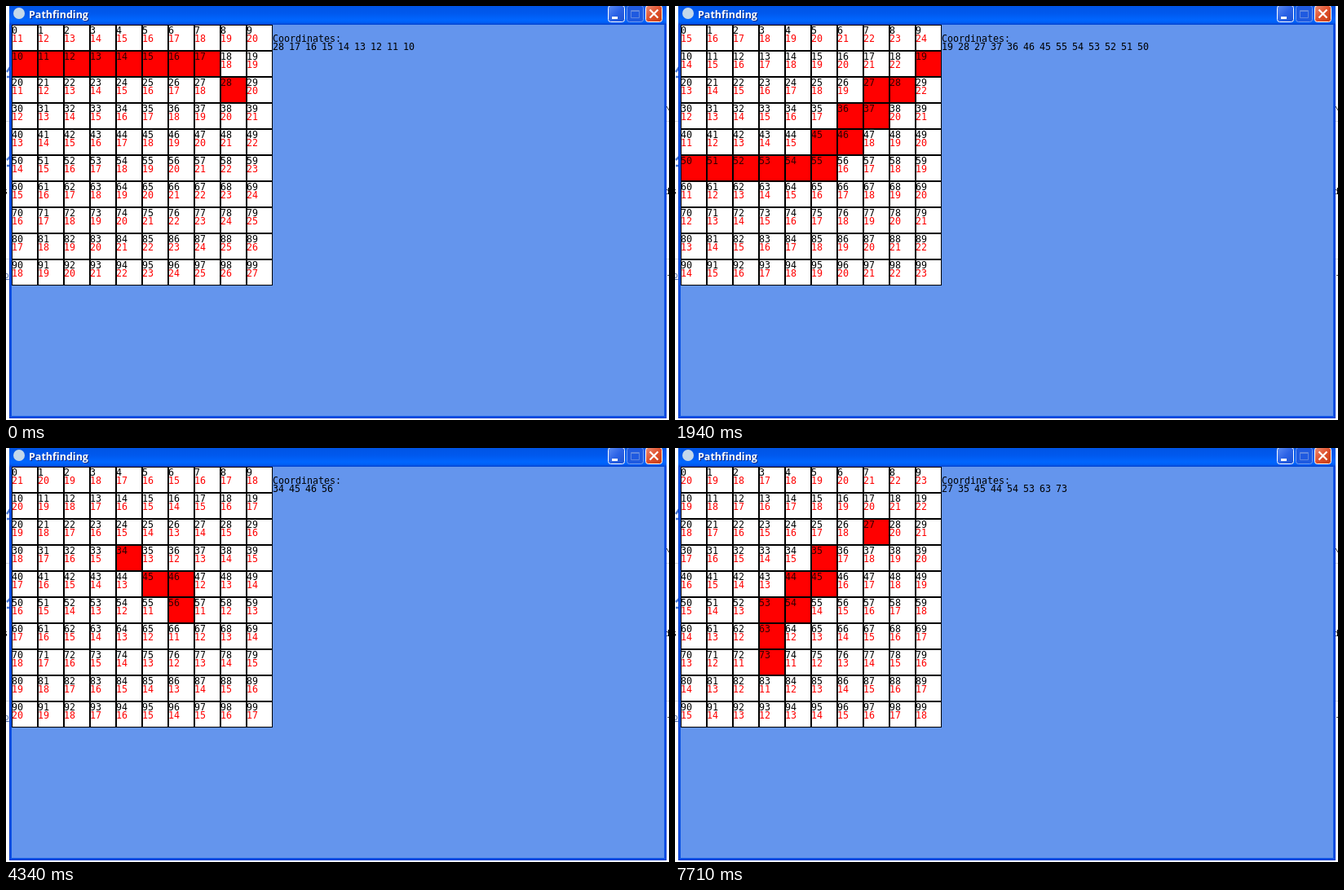
Animation of 813x508 px, one loop 8000 ms. Source, as an HTML page:

```html
<!DOCTYPE html>
<html lang="en">
<head>
<meta charset="utf-8">
<title>Pathfinding</title>
<style>
  html, body { margin: 0; width: 100%; height: 100%; overflow: hidden; background: #fff; }
  svg { display: block; }
  .mono { font: 11.63px "DejaVu Sans Mono", monospace; word-spacing: -1px; }
  .title { font: bold 12.5px "Open Sans", sans-serif; }
  .page { font: 11px "DejaVu Sans", sans-serif; }
</style>
</head>
<body>
<svg id="stage" width="813" height="508" viewBox="0 0 813 508">
  <defs>
    <linearGradient id="bar" x2="0" y2="1">
      <stop offset="0" stop-color="#0054e4"/>
      <stop offset=".4" stop-color="#0059ee"/>
      <stop offset=".75" stop-color="#0066ff"/>
      <stop offset=".88" stop-color="#005ff5"/>
      <stop offset="1" stop-color="#0040cc"/>
    </linearGradient>
    <linearGradient id="blue" x2="1" y2="1">
      <stop offset="0" stop-color="#5c8cf4"/>
      <stop offset=".5" stop-color="#2c63e6"/>
      <stop offset="1" stop-color="#1c50d0"/>
    </linearGradient>
    <linearGradient id="red" x2="1" y2="1">
      <stop offset="0" stop-color="#ee9078"/>
      <stop offset=".5" stop-color="#e0502c"/>
      <stop offset="1" stop-color="#c43c12"/>
    </linearGradient>
  </defs>

  <!-- page behind the window -->
  <rect width="813" height="508" fill="#fff"/>
  <path d="M0 141.5H813M0 310.5H813" stroke="#d4d8e0"/>
  <path d="M5 75L1 81M1 87H5M5 185L1 189M1 196H5" stroke="#4a78d0" stroke-width="2.5" fill="none"/>
  <g class="page">
    <text x="-4" y="231">s</text>
    <text x="-3" y="334" fill="#5570a8" text-decoration="underline">o</text>
    <text x="807" y="231">d</text>
    <path d="M810 123L813 128" stroke="#333"/>
    <rect x="811" y="330" width="2" height="1" fill="#555"/>
  </g>

  <!-- window -->
  <rect x="4" width="806" height="506" fill="#0037d0"/>
  <rect x="5" width="804" height="505" fill="#0a52e4"/>
  <rect x="4" width="806" height="23" fill="url(#bar)"/>
  <rect x="7" y="23" width="800" height="480" fill="#6495ed"/>
  <circle cx="16" cy="9" r="7" fill="#c4d8ea"/>
  <g class="title">
    <text x="29" y="16" fill="#0a2a88">Pathfinding</text>
    <text x="28" y="15" fill="#fff">Pathfinding</text>
  </g>
  <g stroke="#fff">
    <rect x="738.5" y="-.5" width="20" height="20" rx="3" fill="url(#blue)"/>
    <rect x="761.5" y="-.5" width="20" height="20" rx="3" fill="#1f5ae0" stroke="#6f9cf2"/>
    <rect x="784.5" y="-.5" width="20" height="20" rx="3" fill="url(#red)"/>
    <path d="M743 14.5H750" stroke-width="3"/>
    <path d="M766.5 5.5H776.5V14.5H766.5ZM766 6.5H777" stroke="#6088e0" fill="none"/>
    <path d="M789.5 4.5L799.5 14.5M799.5 4.5L789.5 14.5" stroke-width="2.2"/>
  </g>

  <g id="grid" class="mono"></g>
  <g class="mono">
    <text x="327" y="44">Coordinates:</text>
    <text id="list" x="327" y="54"></text>
  </g>
</svg>
<script>
const LOOP = 8000, SIZE = 10, CELL = 32, LEFT = 7, TOP = 23;

// [start time in ms, path from first cell to goal]
const STEPS = [
  [0, "28 17 16 15 14 13 12 11 10"],
  [580, "45 54 53 63 62 72 82"],
  [700, "54 63 62 72 71 81 91"],
  [1790, "32 41 40 50 60"],
  [1940, "19 28 27 37 36 46 45 55 54 53 52 51 50"],
  [3190, "47 56 55 65 75 74 84 94"],
  [3350, "27 35 45 44 54 53 63 73 83"],
  [4220, "60 51 52 42 43 33 34"],
  [4340, "34 45 46 56"],
  [5450, "37 48 58 68 78"],
  [5570, "57 68 78 88 98"],
  [6530, "70 62 52 53 43 44 34 24"],
  [6650, "18 27 37 36 46 45 55"],
  [7710, "27 35 45 44 54 53 63 73"]
];

const grid = document.getElementById("grid");
const list = document.getElementById("list");

function add(tag, attrs, text = "") {
  const el = document.createElementNS("http://www.w3.org/2000/svg", tag);
  for (const key in attrs) el.setAttribute(key, attrs[key]);
  el.textContent = text;
  return grid.appendChild(el);
}

const cells = Array.from({ length: SIZE * SIZE }, (_, i) => {
  const row = Math.floor(i / SIZE), col = i % SIZE;
  const x = LEFT + col * CELL, y = TOP + row * CELL;
  add("rect", { x, y, width: CELL, height: CELL });
  return {
    row, col,
    fill: add("rect", { x: x + 1, y: y + 1, width: CELL - 2, height: CELL - 2 }),
    index: add("text", { x, y: y + 11 }, i),
    cost: add("text", { x, y: y + 21, fill: "#f00" })
  };
});

function show(path) {
  const route = path.split(" ").map(Number);
  const goal = cells[route[route.length - 1]];
  cells.forEach((cell, i) => {
    const onPath = route.includes(i);
    cell.fill.setAttribute("fill", onPath ? "#f00" : "#fff");
    cell.index.setAttribute("fill", onPath ? "#300000" : "#000");
    // base cost plus Manhattan distance to the goal
    const cost = 10 + Math.abs(cell.row - goal.row) + Math.abs(cell.col - goal.col);
    cell.cost.textContent = onPath ? "" : cost;
  });
  list.textContent = path;
}

const begin = performance.now();
let current = null;

function tick() {
  const time = (performance.now() - begin) % LOOP;
  const step = STEPS.filter(([at]) => at <= time).pop();
  if (step !== current) show((current = step)[1]);
  requestAnimationFrame(tick);
}
tick();
</script>
</body>
</html>
```
